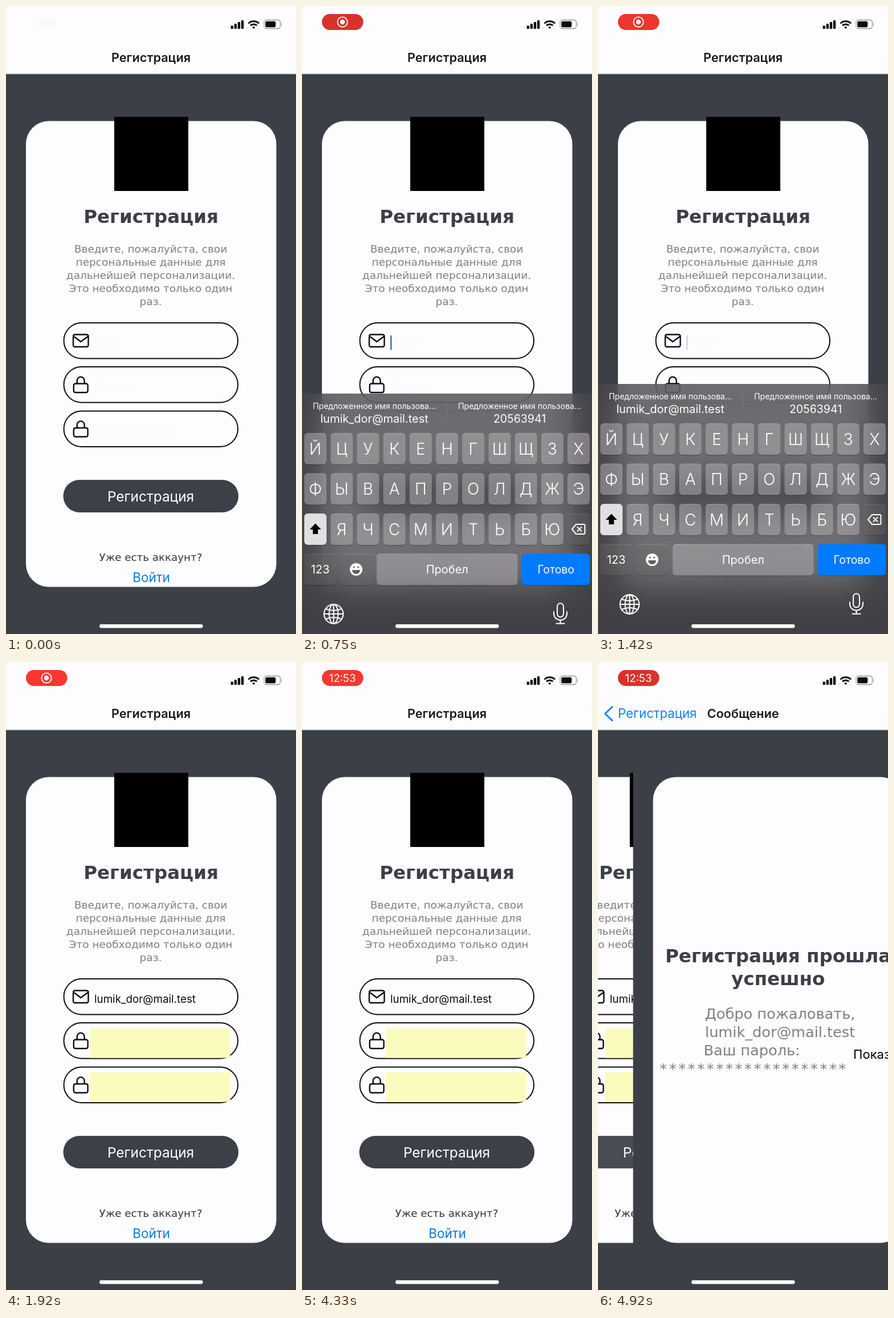
Animation, 509 px wide and 1100 px high, one loop 5.01 s. Source, as an HTML page:

```html
<!DOCTYPE html>
<html lang="ru">
<head>
<meta charset="utf-8">
<title>Регистрация</title>
<style>
  html, body { margin: 0; width: 100%; height: 100%; overflow: hidden; background: #3b4046; }
  #stage { position: relative; width: 509px; height: 1100px; overflow: hidden; }
  svg { display: block; position: absolute; left: 0; top: 0; }
  text { font-family: Inter, "Noto Sans", sans-serif; }
  .wide { font-family: "DejaVu Sans", sans-serif; fill: #7f7f84; }
  .head { font-family: "DejaVu Sans", sans-serif; font-weight: 700; font-size: 32.5px; fill: #3b4046; }
  .para { font-size: 18.5px; }
  .mid { text-anchor: middle; }
  .line { fill: none; stroke: #0c0c0e; stroke-width: 2.4; stroke-linecap: round; stroke-linejoin: round; }
  .field { fill: none; stroke: #0c0c0e; stroke-width: 2; }
  .hint { font-size: 18.8px; fill: #faf8fc; }
  .title { font-size: 21.7px; font-weight: 600; fill: #1a1a1c; }
  #board {
    position: absolute; left: 0; top: 0; width: 509px; height: 1100px;
    background: rgba(67, 66, 70, .76);
    -webkit-backdrop-filter: blur(28px); backdrop-filter: blur(28px);
  }
  #board text { fill: #fff; }
  .glyph { fill: none; stroke: #fff; stroke-width: 2; stroke-linecap: round; stroke-linejoin: round; }
</style>
</head>
<body>
<div id="stage">
  <svg width="509" height="1100">
    <defs>
      <g id="lock" class="line">
        <rect x="118.800" y="661.500" width="24.800" height="15.500" rx="3"/>
        <path d="M124.800 661v-5a6.400 6.400 0 0 1 12.800 0v5"/>
      </g>
      <rect id="card" x="35" y="201.500" width="439.500" height="816" rx="40" fill="#fdfcff"/>
    </defs>
    <rect width="509" height="1100" fill="#3b4046"/>

    <g id="form">
      <use href="#card"/>
      <rect x="190" y="194" width="130" height="130"/>
      <text class="head mid" x="254.500" y="379.500">Регистрация</text>
      <g id="intro"></g>

      <rect class="field" x="101.500" y="555" width="305.500" height="62.500" rx="31.250"/>
      <rect class="field" x="101.500" y="632" width="305.500" height="62.500" rx="31.250"/>
      <rect class="field" x="101.500" y="709.500" width="305.500" height="62.500" rx="31.250"/>
      <g class="line">
        <rect x="118" y="575.500" width="26.500" height="21.500" rx="3"/>
        <path d="M118.500 578.500l12.800 9.500 12.800-9.500"/>
      </g>
      <use href="#lock"/>
      <use href="#lock" y="77.500"/>
      <g id="hints">
        <text id="mailHint" class="hint" x="155" y="597">Email</text>
        <text class="hint" x="155" y="674">Пароль</text>
        <text class="hint" x="155" y="751">Пароль ещё раз</text>
      </g>
      <rect id="caret" x="155" y="577" width="2.500" height="25.500" rx="1" fill="#3a6fc4"/>
      <g id="filled">
        <text x="155" y="597" font-size="18.800" fill="#0c0c0e">lumik_dor@mail.test</text>
        <rect x="147" y="641.500" width="246.500" height="52" fill="#fafbbd"/>
        <rect x="147" y="718.500" width="246.500" height="52" fill="#fafbbd"/>
      </g>

      <g id="button">
        <rect x="100.500" y="830" width="307.500" height="57" rx="28.500" fill="#3b4147"/>
        <text class="mid" x="254" y="867.500" font-size="24.400" fill="#fff">Регистрация</text>
      </g>
      <text class="wide mid" x="254" y="971.500" font-size="18.300" style="fill:#35363a">Уже есть аккаунт?</text>
      <text class="mid" x="255" y="1008.500" font-size="22.500" fill="#0b7be0">Войти</text>
    </g>

    <g id="message">
      <rect y="119" width="509" height="981" fill="#3b4046"/>
      <use href="#card"/>
      <text class="head mid" x="254.500" y="525.500">Регистрация прошла</text>
      <text class="head mid" x="254.500" y="565.500">успешно</text>
      <g class="mid" font-size="25.600">
        <text class="wide" x="258" y="625">Добро пожаловать,</text>
        <text class="wide" x="258" y="656.500">lumik_dor@mail.test</text>
        <text class="wide" x="208.500" y="688.500">Ваш пароль:</text>
        <text class="wide" x="212" y="721" letter-spacing="3.750">********************</text>
      </g>
      <text x="386.500" y="695" font-size="22">Показать</text>
    </g>

    <rect width="509" height="119" fill="#fdfcff"/>
    <rect y="118.500" width="509" height="1" fill="#b4b5b9"/>
    <text id="oldTitle" class="title mid" x="254.500" y="98">Регистрация</text>
    <g id="back" fill="none">
      <path d="M25 78.500L12.500 90.500 25 102.500" stroke="#1483f5" stroke-width="3" stroke-linecap="round" stroke-linejoin="round"/>
      <text x="35" y="98" font-size="22.200" fill="#1483f5">Регистрация</text>
    </g>
    <text id="newTitle" class="title mid" x="254.500" y="98">Сообщение</text>

    <g id="bars"></g>
    <g fill="none" stroke="#0a0a0c" stroke-width="3">
      <path d="M425.500 30.500a13 13 0 0 1 18.400 0"/>
      <path d="M429 34.300a8 8 0 0 1 11.400 0"/>
      <path d="M434.700 40l-2.600-2.700a3.700 3.700 0 0 1 5.200 0z" fill="#0a0a0c" stroke="none"/>
    </g>
    <rect x="453" y="24.500" width="28.500" height="15" rx="4.500" fill="none" stroke="#97979b" stroke-width="1.300"/>
    <rect x="455.300" y="26.800" width="18" height="10.400" rx="2.500" fill="#0a0a0c"/>
    <path d="M483.500 29.500q2.500 2.500 0 5z" fill="#97979b"/>

    <rect x="55" y="21" width="34" height="16" rx="4" fill="#faf9fc"/>
    <g id="pill">
      <rect id="pillBg" x="35" y="14" width="72.500" height="28" rx="14"/>
      <g id="record">
        <circle cx="71" cy="28" r="8.700" fill="none" stroke="#fff" stroke-width="1.800"/>
        <circle cx="71" cy="28" r="4.200" fill="#fff"/>
      </g>
      <text id="clock" class="mid" x="71" y="34.700" font-size="18.600" fill="#fff">12:53</text>
    </g>
  </svg>

  <div id="board">
    <svg width="509" height="438">
      <path d="M254.500 17v32" stroke="#77787b"/>
      <g class="mid">
        <text x="127" y="27" font-size="14.100">Предложенное имя пользова...</text>
        <text x="382" y="27" font-size="14.100">Предложенное имя пользова...</text>
        <text x="127" y="50.500" font-size="20">lumik_dor@mail.test</text>
        <text x="382" y="50.500" font-size="19.500">20563941</text>
      </g>
      <g id="keys" class="mid"></g>
      <path d="M23.500 227.500l10 10.500h-5.500v8h-9v-8h-5.500z"/>
      <path class="glyph" d="M481 229h13.500q2 0 2 2v13q0 2-2 2H481l-7-8.500zM483.500 234l7 7m0-7l-7 7"/>
      <circle cx="95" cy="308" r="11" fill="#fff"/>
      <path d="M88 309h14a7 7 0 0 1-14 0z" fill="#5c5d5f"/>
      <circle cx="91.300" cy="304" r="1.600" fill="#5c5d5f"/>
      <circle cx="98.700" cy="304" r="1.600" fill="#5c5d5f"/>
      <g class="glyph" transform="translate(55.500 386)">
        <circle r="16.800"/>
        <ellipse rx="8" ry="16.800"/>
        <path d="M0-16.800v33.600M-16.800 0h33.600M-14-9q14 6 28 0M-14 9q14-6 28 0"/>
      </g>
      <g class="glyph" transform="translate(453.500 385.300)">
        <rect x="-5.500" y="-18" width="11" height="24" rx="5.500"/>
        <path d="M-11.500-3v3.500a11.500 11 0 0 0 23 0v-3.500M0 11.500v6M-7 17.500h14"/>
      </g>
    </svg>
  </div>

  <svg width="509" height="1100">
    <rect x="164" y="1083" width="181.500" height="6.500" rx="3.250" fill="#fff"/>
  </svg>
</div>

<script>
const LOOP = 5010, STEP = 1000 / 12, LAST = 59;
const KEYS_TOP = 662, WIDTH = 509;
const $ = id => document.getElementById(id);

function add(parent, tag, attrs, content) {
  const el = document.createElementNS('http://www.w3.org/2000/svg', tag);
  for (const name in attrs) el.setAttribute(name, attrs[name]);
  if (content) el.textContent = content;
  parent.appendChild(el);
}

['Введите, пожалуйста, свои', 'персональные данные для', 'дальнейшей персонализации.',
 'Это необходимо только один', 'раз.'].forEach((line, i) =>
  add($('intro'), 'text', { class: 'wide para mid', x: 254, y: 431.5 + 23 * i }, line));

for (let i = 0; i < 4; i++) {
  const h = 5.5 + 3.2 * i;
  add($('bars'), 'rect', { x: 394.5 + 6.1 * i, y: 40 - h, width: 4.4, height: h, rx: 1.2, fill: '#0a0a0c' });
}

function key(x, y, w, fill, label, size, weight) {
  const box = { x, width: w, height: 55, rx: 6 };
  add($('keys'), 'rect', { ...box, y: y + 1.5, fill: 'rgba(0,0,0,.2)' });
  add($('keys'), 'rect', { ...box, y, fill });
  if (label) add($('keys'), 'text',
    { x: x + w / 2, y: y + 27.5 + size * .36, 'font-size': size, 'font-weight': weight }, label);
}

const LIGHT = 'rgba(255,253,255,.34)', DIM = 'rgba(255,253,255,.12)';
['ЙЦУКЕНГШЩЗХ', 'ФЫВАПРОЛДЖЭ', '↑ЯЧСМИТЬБЮ←'].forEach((row, r) =>
  [...row].forEach((ch, i) => {
    const fill = ch === '↑' ? '#e0dfe1' : ch === '←' ? DIM : LIGHT;
    key(4 + 46.2 * i, 69 + 70.5 * r, 39, fill, '↑←'.includes(ch) ? '' : ch, 28, 300);
  }));
key(4, 280.5, 56, DIM, '123', 20, 400);
key(67, 280.5, 57, DIM);
key(131, 280.5, 247.5, LIGHT, 'Пробел', 20, 400);
key(386, 280.5, 119.5, '#007aff', 'Готово', 19.5, 400);

const ramp = (t, a, b) => Math.min(1, Math.max(0, (t - a) / (b - a)));
// Share of the way still to go for a critically damped spring.
const spring = (t, start, rate) => {
  const x = Math.max(0, t - start) / 1000 * rate;
  return (1 + x) * Math.exp(-x);
};
const fade = (id, value) => { $(id).style.opacity = value; };
const move = (id, x) => $(id).setAttribute('transform', `translate(${x} 0)`);
const show = (id, on) => { $(id).style.display = on ? '' : 'none'; };

function draw(t) {
  const done = t >= 1825;

  // recording pill
  const glow = Math.min(1, Math.max(0, .5 - 1.5 * Math.cos((t - 850) / 2150 * 2 * Math.PI)));
  const mix = (a, b) => Math.round(a + (b - a) * glow);
  $('pillBg').setAttribute('fill', `rgb(${mix(215, 248)},${mix(51, 55)},${mix(44, 47)})`);
  fade('pill', ramp(t, 10, 165));
  const swap = ramp(t, 3070, 3270);
  fade('record', 1 - swap);
  fade('clock', swap);

  // keyboard and fields
  show('board', t > 550 && !done);
  const top = KEYS_TOP + (1100 - KEYS_TOP) * spring(t, 550, 25.3);
  $('board').style.transform = `translateY(${top}px)`;
  show('caret', t > 490 && !done);
  fade('caret', 1 - ramp(t, 1330, 1450) + ramp(t, 1690, 1800));
  show('hints', !done);
  $('mailHint').setAttribute('x', t > 490 ? 161 : 155);
  show('filled', done);

  // button press and push to the next screen
  fade('button', 1 - .6 * ramp(t, 4550, 4670) * (1 - ramp(t, 4690, 4945)));
  const left = spring(t, 4740, 20.65);
  move('form', -.3 * WIDTH * (1 - left));
  move('message', WIDTH * left);
  const head = ramp(t, 4730, 4900);
  fade('oldTitle', 1 - ramp(head, 0, .6));
  fade('back', head);
  fade('newTitle', head);
  move('oldTitle', -150 * head);
  move('back', 110 * (1 - head));
  move('newTitle', 150 * (1 - head));
}

const begin = performance.now();
function tick() {
  const t = (performance.now() - begin) % LOOP;
  draw(Math.min(LAST, Math.floor((t + 3.4) / STEP)) * STEP);
  requestAnimationFrame(tick);
}
tick();
</script>
</body>
</html>
```
